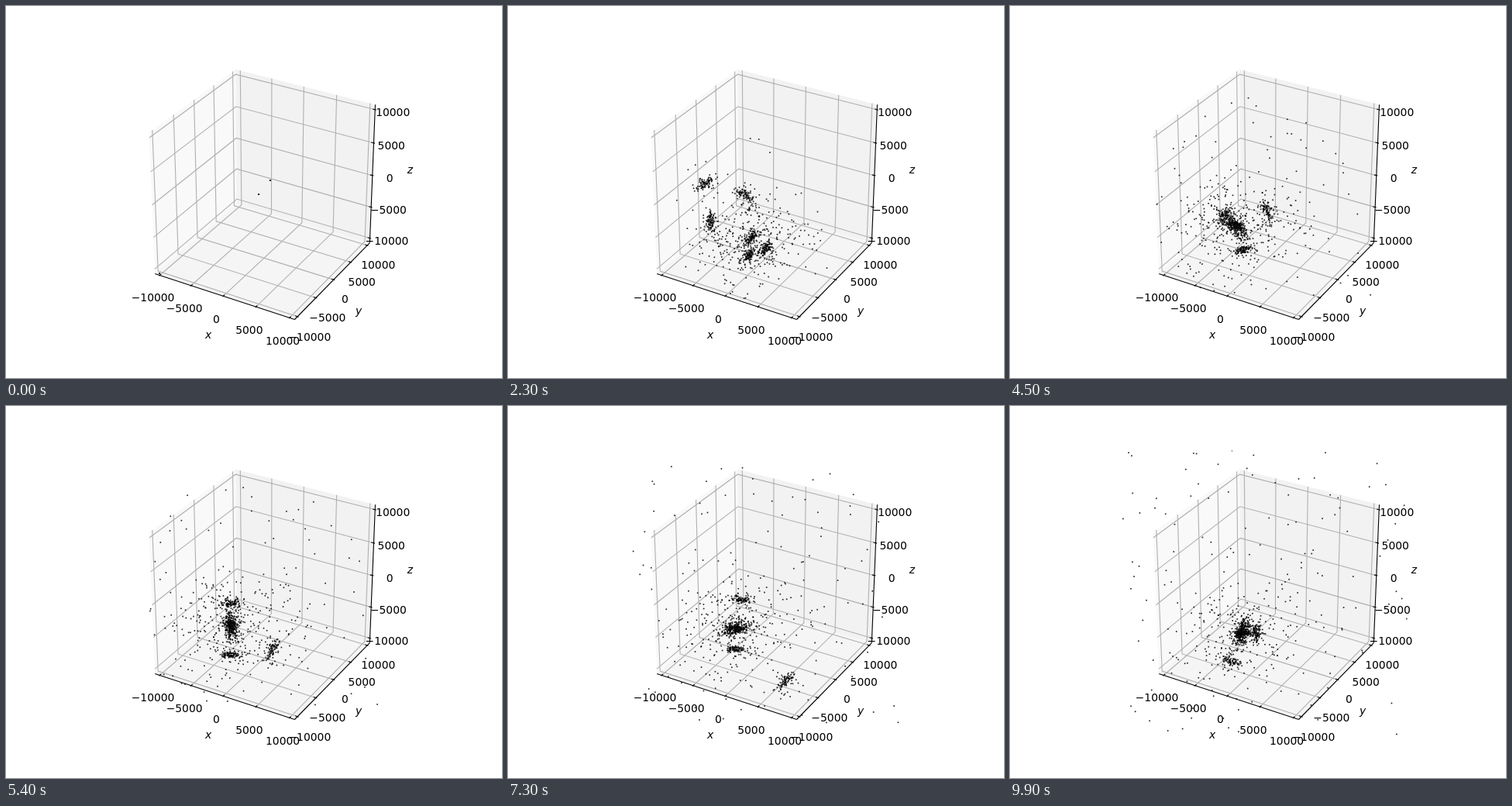
Recreate the animation shown at these times as an HTML page with a canvas. Size 640 px wide and 480 px high, loop 10000 ms.

```html
<!DOCTYPE html>
<html lang="en">
<head>
<meta charset="utf-8">
<title>Particle clusters</title>
<style>
html, body { margin: 0; width: 100%; height: 100%; overflow: hidden; background: #fff; }
canvas { display: block; width: 640px; height: 480px; }
</style>
</head>
<body>
<canvas id="stage" width="640" height="480"></canvas>
<script>
const ctx = document.getElementById('stage').getContext('2d');
const LOOP = 10000, STEP = 100, TAU = 2 * Math.PI;
const FONT = '13.89px "DejaVu Sans", sans-serif';
const EDGE = 0.5208, SPAN = 20660;
const BOX = { x: 143.2, y: 57.6, size: 369.6 };

// Perspective view: elevation 30°, azimuth -60°, camera distance 10.
function project([x, y, z]) {
  const u = 0.866 * x + 0.5 * y;
  const v = -0.25 * x + 0.433 * y + 0.866 * z;
  const depth = 10 - (0.433 * x - 0.75 * y + 0.5 * z);
  return [333 + 1997.8 * u / depth, 237.4 - 1997.8 * v / depth];
}

function path(points) {
  ctx.beginPath();
  for (const p of points) ctx.lineTo(...project(p));
}

function stroke(points, color) {
  path(points);
  ctx.strokeStyle = color;
  ctx.stroke();
}

function pane(color, points) {
  path(points);
  ctx.fillStyle = color;
  ctx.fill();
}

function label(text, x, baseline, style = '') {
  ctx.font = style + FONT;
  ctx.fillText(text, x, Math.round(baseline));
}

function drawAxes() {
  const e = EDGE, q = 0.606, a = e + 0.0083, b = e - 0.0167;
  pane('#f9f9f9', [[-e, -e, -e], [-e, e, -e], [-e, e, e], [-e, -e, e]]);
  pane('#f2f2f2', [[-e, e, -e], [e, e, -e], [e, e, e], [-e, e, e]]);
  pane('#f5f5f5', [[-e, -e, -e], [e, -e, -e], [e, e, -e], [-e, e, -e]]);

  const axes = [
    { line: [[-e, -e, -e], [e, -e, -e]],
      grid: p => [[p, -e, -e], [p, e, -e], [p, e, e]],
      tick: p => [[p, -a, -e], [p, -b, -e]],
      text: p => [p, -q, -q] },
    { line: [[e, -e, -e], [e, e, -e]],
      grid: p => [[e, p, -e], [-e, p, -e], [-e, p, e]],
      tick: p => [[a, p, -e], [b, p, -e]],
      text: p => [q, p, -q] },
    { line: [[e, e, -e], [e, e, e]],
      grid: p => [[-e, -e, p], [-e, e, p], [e, e, p]],
      tick: p => [[a, e, p], [b, e, p]],
      text: p => [q, q, p] }
  ];
  const ticks = [-10000, -5000, 0, 5000, 10000];
  ctx.lineWidth = 1.11;
  for (const axis of axes)
    for (const n of ticks) stroke(axis.grid(n / SPAN), '#b0b0b0');

  ctx.textAlign = 'center';
  for (const axis of axes) {
    stroke(axis.line, '#000');
    ctx.fillStyle = '#000';
    for (const n of ticks) {
      stroke(axis.tick(n / SPAN), '#000');
      const [x, y] = project(axis.text(n / SPAN));
      label(String(n).replace('-', '\u2212'), x, y + 11.5);
    }
  }
  label('x', 261, 429, 'italic ');
  label('y', 455, 398, 'italic ');
  label('z', 521.5, 216, 'italic ');
}

let seed = 20117;
function rand() {
  seed = (seed * 1664525 + 1013904223) % 4294967296;
  return seed / 4294967296;
}
function gauss() {
  return Math.sqrt(-2 * Math.log(1 - rand())) * Math.cos(TAU * rand());
}

function makePoints(n) {
  return Array.from({ length: n }, () => ({
    a: gauss(), b: gauss(), c: gauss(),
    tail: rand() < 0.18 ? 3.5 : 1,
    spin: (rand() - 0.5) * 0.5,
    launch: 8.5 * Math.pow(rand(), 1.2),
    goal: [380 * (rand() - 0.5), 368 * (rand() - 0.5)]
  }));
}

// Seed spots the points burst from, and the paths of the outer clusters.
const NEAR = [326, 243], FAR = [341, 225], CORNER = [198, 345];
const TIMES = [1.4, 3.1, 4.5, 6.3, 8.4, 9.9];
const outer = [
  { from: FAR, way: [[288, 221], [318, 263], [331, 264], [357, 364], [361, 344], [285, 330]] },
  { from: FAR, way: [[235, 229], [268, 231], [275, 272], [303, 237], [296, 265], [300, 293]] },
  { from: CORNER, way: [[264, 264], [259, 288], [301, 314], [278, 327], [312, 297], [318, 292]] }
];
for (const c of outer) c.points = makePoints(95);
const core = makePoints(320);
const cloud = makePoints(170);
const strays = makePoints(160);

function along(way, t) {
  let i = 0;
  while (i < TIMES.length - 2 && t >= TIMES[i + 1]) i++;
  const s = Math.max(0, Math.min(1, (t - TIMES[i]) / (TIMES[i + 1] - TIMES[i])));
  const k = s * s * (3 - 2 * s);
  return way[i].map((v, j) => v + (way[i + 1][j] - v) * k);
}

function drawPoints(t) {
  const burst = Math.pow(Math.min(1, t / 1.4), 0.6);
  const hub = [279 + 2.1 * t, 272 + 2 * t];

  function dot(x, y, from) {
    ctx.beginPath();
    ctx.arc(from[0] + (x - from[0]) * burst, from[1] + (y - from[1]) * burst, 1, 0, TAU);
    ctx.fill();
  }

  // A streak of points with half length len at the given angle.
  function streak(p, x, y, angle, len, from) {
    const u = 0.6 * len * p.a, r = 2.6 * p.tail;
    dot(x + u * Math.cos(angle) + r * p.b, y + u * Math.sin(angle) + r * p.c, from);
  }

  ctx.save();
  ctx.beginPath();
  ctx.rect(BOX.x, BOX.y, BOX.size, BOX.size);
  ctx.clip();
  ctx.fillStyle = 'rgba(0,0,0,0.8)';

  // The outer clusters lie across the line to the hub.
  for (const c of outer) {
    const [x, y] = along(c.way, t);
    const angle = Math.atan2(y - hub[1], x - hub[0]) + Math.PI / 2;
    for (const p of c.points) streak(p, x, y, angle, 11, c.from);
  }

  // The core starts as three lobes, falls into the hub and turns there.
  const fall = Math.max(0, 1 - (t / 4.6) ** 2);
  const cx = hub[0] + 47 * fall, cy = hub[1] + 46 * fall;
  const turn = 0.79 + 0.77 * (t - 4.5);
  core.forEach((p, i) => {
    const lobe = 0.1 + TAU * (i % 3) / 3, gap = 4 + 13 * fall;
    streak(p, cx + gap * Math.cos(lobe), cy + gap * Math.sin(lobe),
      turn, 6 + 8 * (1 - fall), NEAR);
  });

  const hx = hub[0] + 36 * fall, hy = hub[1] + 35 * fall;
  const wide = Math.min(42, 20 + 7 * t);
  function hover(p) {
    const cos = Math.cos(p.spin * t), sin = Math.sin(p.spin * t);
    return [hx + wide * (p.a * cos - p.b * sin), hy + 0.68 * wide * (p.a * sin + p.b * cos)];
  }
  for (const p of cloud) dot(...hover(p), NEAR);

  const reach = Math.min(1, 0.4 + 0.06 * t);
  for (const p of strays) {
    const [x, y] = hover(p);
    const k = 1.1 * (1 - Math.exp(-Math.max(0, t - p.launch) / 1.2));
    dot(x + (328 + p.goal[0] * reach - x) * k,
      y + (250 + p.goal[1] * reach - y) * k, NEAR);
  }
  ctx.restore();
}

const origin = performance.now();
function frame() {
  const time = (performance.now() - origin) % LOOP;
  ctx.fillStyle = '#fff';
  ctx.fillRect(0, 0, 640, 480);
  drawAxes();
  drawPoints(Math.floor(time / STEP) * STEP / 1000);
  requestAnimationFrame(frame);
}
frame();
</script>
</body>
</html>
```
